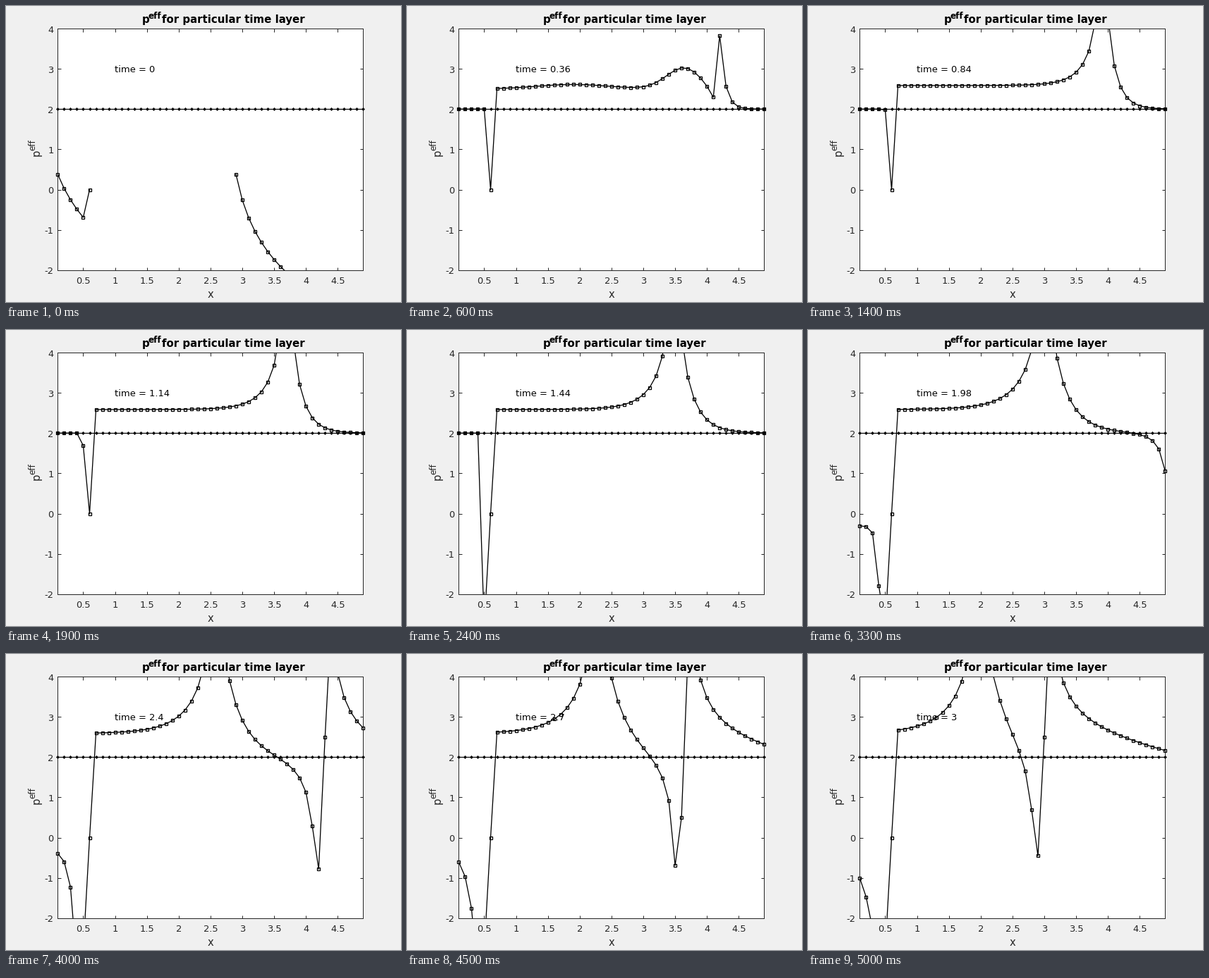
Recreate the animation shown at these times as a matplotlib script. Size 560 by 420 pixels, loop 5100 ms.

```python
import numpy as np
import matplotlib.pyplot as plt
from matplotlib.animation import FuncAnimation

W, H, DPI = 560, 420, 100
PX = 72 / DPI              # one pixel in points
FRAMES, INTERVAL = 51, 100
DARK = "#262626"
LEFT, RIGHT, BOTTOM, TOP = 73.4, 506.45, 45.1, 388.05   # axes box in pixels
X = np.arange(1, 50) / 10

# a few key points in time: place of the peak, decay on its two sides,
# place of the incoming front and decay ahead of it
STEPS = [0, 6, 14, 24, 33, 40, 50]
PEAK = [2.85, 4.15, 3.875, 3.45, 2.965, 2.545, 1.93]
RISE = [4, 4, 3.6, 3.15, 2.55, 2.43, 2.2]
FALL = [7, 7, 5.7, 4.0, 3.07, 2.6, 1.93]
FRONT = [9, 8.3, 7.3, 6.3, 5.07, 4.25, 2.95]
AHEAD = [6, 6, 6, 5, 4, 1.3, 1.2]


def at(n, keys):
    return np.interp(n, STEPS, keys)


def initial():
    y = np.full(X.size, np.nan)
    y[:5] = 0.38 - 1.43 * np.log1p(np.arange(5) / 3.6)
    y[5] = 0
    y[28:] = 0.38 - 1.43 * np.log1p(np.arange(21) / 1.77)
    return y


def inlet(n):
    """First five points: a dip that grows and spreads from the fifth."""
    later = max(n - 33, 0)
    depth = 3.3 - 1.8 * np.exp(-later / 4.5)
    spread = 0.12 + 0.48 * later / 17
    ramp = np.clip((n - 24) / 9, 0, 1) ** 2
    y = 2 - ramp * (2.3 + depth * spread ** np.arange(4, -1, -1.0) / spread)
    y[4] = max(2 - 0.02 * np.exp(0.548 * (n - 14)), -2.8)
    return y


def early(x, n):
    """Smooth hump, dip and spike that run with the peak."""
    d = x - at(n, PEAK)
    before = (2.5 + 0.11 * np.exp(-((x - 1.9) / 0.8) ** 2)
              + 0.54 * np.exp(-((d + 0.5) / 0.4) ** 2)
              - 0.5 * np.exp(np.minimum(d, 0) / 0.15))
    after = 2 + 1.82 * np.exp(-np.maximum(d - 0.05, 0) / 0.085)
    return np.where(d < 0, before, after)


def late(x, n):
    """Sharp peak, met by a front that comes in from the right."""
    d = x - at(n, PEAK)
    r = np.maximum(abs(d), 0.03)
    height = 1.4 - 0.45 * np.exp(-(n - 14) / 12)
    left = 2.585 + height * np.exp(-at(n, RISE) * r) * r ** -0.3
    right = 2 + 2.48 * np.exp(-at(n, FALL) * r) * r ** -0.3

    e = x - at(n, FRONT)
    gap = np.maximum(abs(e), 0.1)
    right -= 0.32 * np.exp(-at(n, AHEAD) * gap) / gap
    wake = 2.16 + 0.037 * (n - 40) + 0.5 / gap - 0.32 * e
    wake = np.minimum(wake, 0.5 + 40 * e)
    return np.where(d < 0, left, np.where(e < 0, right, wake))


def pressure(n):
    if n == 0:
        return initial()
    u = np.clip((n - 6) / 8, 0, 1)
    w = u * u * (3 - 2 * u)
    rest = X[6:]
    body = (1 - w) * early(rest, n) + w * late(rest, n)
    return np.concatenate((inlet(n), [0], body))


fig = plt.figure(figsize=(W / DPI, H / DPI), dpi=DPI, facecolor="#f0f0f0")
ax = fig.add_axes([LEFT / W, BOTTOM / H, (RIGHT - LEFT) / W, (TOP - BOTTOM) / H])
ax.set(xlim=(0.1, 4.9), ylim=(-2, 4))
ax.set_xticks(np.arange(0.5, 4.6, 0.5))
ax.set_yticks(range(-2, 5))
ax.tick_params(direction="in", top=True, right=True, length=4.5 * PX, width=PX,
               color=DARK, labelbottom=False, labelleft=False)
for spine in ax.spines.values():
    spine.set(color=DARK, linewidth=PX)


def label(x, y, text, size=13, color=DARK, **kw):
    """Text with its baseline at a pixel place counted from the top left."""
    return fig.text(x / W, 1 - y / H, text, fontsize=size * PX, color=color,
                    va="baseline", **kw)


for v in ax.get_xticks():
    label(LEFT + (v - 0.1) * (RIGHT - LEFT) / 4.8, 393.5, f"{v:g}", ha="center")
for v in ax.get_yticks():
    label(67.5, 37.5 + (4 - v) * (TOP - BOTTOM) / 6, f"{v:g}", ha="right")

title = dict(color="black", weight="bold")
label(192.5, 24, "p", 15, **title)
label(201.8, 18.3, "eff", 12, **title)
label(221, 24, "for particular time layer", 15, **title)
label(290, 413.5, "x", 14.7, ha="center")
turned = dict(rotation=90, rotation_mode="anchor")
label(47.5, 213, "p", 14.7, **turned)
label(41.5, 204.5, "eff", 12, **turned)
clock = label(154, 94, "", 13, "black")

curve, = ax.plot([], [], "k-", lw=1.3 * PX)
boxes, = ax.plot([], [], "ks", ms=5 * PX, mew=1.3 * PX, mfc="none",
                 clip_on=False, zorder=5)
ax.plot(X, np.full(X.size, 2), "k-", lw=1.2 * PX)
ax.plot(X, np.full(X.size, 2), "kD", ms=3.1 * PX, mew=0.4 * PX, clip_on=False, zorder=5)


def draw(n):
    y = pressure(n)
    curve.set_data(X, y)
    boxes.set_data(X, np.where((y >= -2) & (y <= 4), y, np.nan))
    clock.set_text(f"time = {0.06 * n:.4g}")
    return curve, boxes, clock


anim = FuncAnimation(fig, draw, frames=FRAMES, interval=INTERVAL, repeat=True)
plt.show()
```
